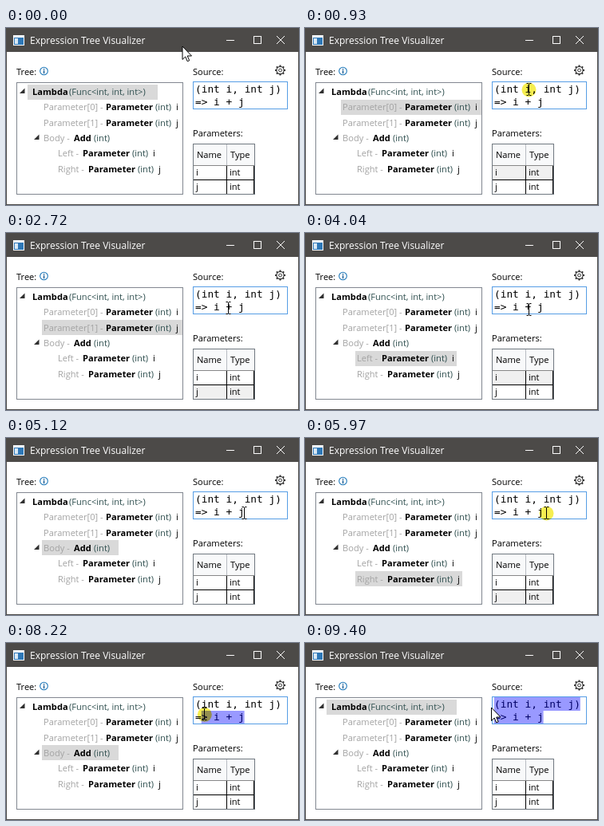
An HTML page with a canvas that plays this animation: 367x222 px, repeating every 9.69 s.

```html
<!DOCTYPE html>
<html lang="en">
<head>
<meta charset="utf-8">
<title>Expression Tree Visualizer</title>
<style>
html, body { margin: 0; width: 100%; height: 100%; overflow: hidden; background: #fff; }
canvas { display: block; }
</style>
</head>
<body>
<canvas id="stage" width="367" height="222"></canvas>
<script>
const g = document.getElementById('stage').getContext('2d');
const LOOP = 9690;
const UI = '"Open Sans", "Noto Sans", sans-serif';
const CODE = '12.8px "DejaVu Sans Mono", monospace';
const SLATE = '#2f4f4f', GREY = '#a3a3a3', BLACK = '#000', FRAME = '#4c4a48';
const ROW = 19.3, CHAR = 7.7, CODE_X = 237;

// Pointer path: time, x, y
const path = [
  [70, 221, 23], [800, 280, 77], [1210, 280, 77], [1700, 337, 77], [2260, 337, 77],
  [2720, 278, 94], [3270, 265, 97], [3700, 265, 96], [4040, 280, 96], [4600, 280, 96],
  [5300, 302, 94], [6000, 302, 94], [6500, 285, 94], [7280, 266, 94], [7430, 266, 94],
  [7600, 257, 95], [7840, 257, 95], [8750, 234, 80]
];
const presses = [[800, 1210], [1720, 2110], [3420, 3720], [4350, 4700], [5500, 9000]];
const picks = [[0, 0], [850, 1], [1800, 2], [3480, 4], [4450, 3], [5350, 5], [6450, 3], [8250, 0]];

// Tree rows: left and right of the highlight, then text parts as x, text, colour, bold
const tree = [
  [27, 190, [33, 'Lambda', BLACK, 1], [79, '(Func<int, int, int>)', SLATE]],
  [45, 221, [47, 'Parameter[0] - ', GREY], [125, 'Parameter', BLACK, 1], [187, '(int)', SLATE], [213, 'i', BLACK]],
  [45, 221, [47, 'Parameter[1] - ', GREY], [125, 'Parameter', BLACK, 1], [187, '(int)', SLATE], [213, 'j', BLACK]],
  [45, 141, [47, 'Body - ', GREY], [85, 'Add', BLACK, 1], [110, '(int)', SLATE]],
  [63, 190, [65, 'Left - ', GREY], [96, 'Parameter', BLACK, 1], [158, '(int)', SLATE], [184, 'i', BLACK]],
  [63, 197, [65, 'Right - ', GREY], [103, 'Parameter', BLACK, 1], [165, '(int)', SLATE], [191, 'j', BLACK]]
];

function rect(x, y, w, h, color) {
  g.fillStyle = color;
  g.fillRect(x, y, w, h);
}

function box(x, y, w, h, color) {
  g.lineWidth = 1;
  g.strokeStyle = color;
  g.strokeRect(x + .5, y + .5, w - 1, h - 1);
}

function line(color, width, ...points) {
  g.beginPath();
  points.forEach(([x, y]) => g.lineTo(x, y));
  g.lineWidth = width;
  g.strokeStyle = color;
  g.stroke();
}

function disc(x, y, r) {
  g.beginPath();
  g.arc(x, y, r, 0, Math.PI * 2);
}

function text(str, x, y, color = BLACK, font = '11.1px ' + UI) {
  g.font = font;
  g.fillStyle = color;
  g.fillText(str, x, y);
}

function pointerAt(t) {
  const i = path.findIndex(p => p[0] > t);
  if (i < 0) return path[path.length - 1].slice(1);
  if (!i) return path[0].slice(1);
  const [t0, x0, y0] = path[i - 1], [t1, x1, y1] = path[i];
  const u = (t - t0) / (t1 - t0), e = u * u * (3 - 2 * u);
  return [x0 + (x1 - x0) * e, y0 + (y1 - y0) * e];
}

function drawWindow() {
  rect(0, 0, 367, 222, '#fff');
  box(0, 0, 367, 222, FRAME);
  rect(0, 0, 367, 30, FRAME);
  rect(9, 9, 14, 13, '#fff');
  rect(10, 12, 12, 9, '#2f78b7');
  rect(11, 13, 4, 7, '#d8e8f5');
  text('Expression Tree Visualizer', 30, 19.5, '#fff', '12px ' + UI);
  line('#fff', 1, [276, 15.5], [286, 15.5]);
  box(310, 10, 10, 10, '#fff');
  line('#fff', 1, [339, 10], [349, 20]);
  line('#fff', 1, [349, 10], [339, 20]);
}

function drawIcons() {
  disc(47.5, 54, 4.8);
  g.lineWidth = 1.1;
  g.strokeStyle = '#1b76b8';
  g.stroke();
  rect(46.8, 51, 1.5, 1.4, '#1b5f98');
  rect(46.8, 53.2, 1.5, 4, '#1b5f98');

  g.strokeStyle = '#333';
  disc(343.5, 53, 4.6);
  g.lineWidth = 1.2;
  g.stroke();
  disc(343.5, 53, 1.9);
  g.lineWidth = 1;
  g.stroke();
  for (let k = 0; k < 8; k++) {
    const c = Math.cos(k * Math.PI / 4), s = Math.sin(k * Math.PI / 4);
    line('#333', 2, [343.5 + 4.6 * c, 53 + 4.6 * s], [343.5 + 6.5 * c, 53 + 6.5 * s]);
  }
}

function drawTree(picked) {
  text('Tree:', 13, 58.5);
  box(13, 68, 209, 141, '#828790');
  tree.forEach(([left, right, ...parts], i) => {
    const y = 70.5 + ROW * i;
    if (i === picked) rect(left, Math.round(y), right - left, 19, '#d9d9d9');
    for (const [x, str, color, bold] of parts)
      text(str, x, Math.round(y + 13.5), color, (bold ? 'bold ' : '') + '11.1px ' + UI);
  });
  for (const [x, y] of [[17, 82], [35, 140]]) {
    g.beginPath();
    g.moveTo(x, y);
    g.lineTo(x + 6.5, y);
    g.lineTo(x + 6.5, y - 6.5);
    g.fillStyle = '#303030';
    g.fill();
  }
}

function drawTable(picked) {
  text('Parameters:', 234, 136);
  rect(235, 146, 76, 27, '#f8f9fa');
  text('Name', 239, 163);
  text('Type', 281, 163);
  ['i', 'j'].forEach((name, i) => {
    const y = 173 + 18 * i;
    if (picked === 1 + i || picked === 4 + i) rect(235, y, 76, 17, '#f0f0f0');
    text(name, 238, y + 12);
    text('int', 280, y + 12);
    line(BLACK, 1, [235, y + 17.5], [311, y + 17.5]);
  });
  line('#b8bcc2', 1, [276.5, 146], [276.5, 172]);
  line('#888', 1, [235, 172.5], [311, 172.5]);
  line(BLACK, 1, [276.5, 173], [276.5, 208]);
  line(BLACK, 1, [310.5, 173], [310.5, 208]);
  box(234, 145, 78, 64, '#707880');
}

function drawSource(t, x, y) {
  text('Source:', 234, 58.5);
  box(234, 67, 119, 35, '#569de5');
  text('(int i, int j)', CODE_X, 81, BLACK, CODE);
  text('=> i + j', CODE_X, 97, BLACK, CODE);
  if (t < 6000) return;
  const col = Math.max(0, Math.min(14, Math.round((x - CODE_X) / CHAR)));
  const upper = y < 85, tint = 'rgba(0,0,255,.4)';
  const select = (from, to, top, h) =>
    rect(CODE_X + from * CHAR, top, (to - from) * CHAR, h, tint);
  if (upper) select(col, 14, 68, 17);
  select(upper ? 0 : Math.min(col, 8), 8, 85, 16);
}

function drawArrow(x, y) {
  g.beginPath();
  [[0, 0], [0, 16.5], [3.7, 13], [6.2, 18.8], [8.7, 17.8], [6.2, 12], [11.5, 12]]
    .forEach(([dx, dy]) => g.lineTo(x + dx, y + dy));
  g.closePath();
  g.fillStyle = '#fff';
  g.fill();
  g.lineWidth = 1;
  g.strokeStyle = BLACK;
  g.stroke();
}

function drawBeam(x, y) {
  x = Math.round(x) + .5;
  y = Math.round(y);
  line(BLACK, 1, [x, y - 7], [x, y + 7]);
  for (const s of [-1, 1]) {
    line(BLACK, 1, [x - 3, y + 7.5 * s], [x - .5, y + 7.5 * s]);
    line(BLACK, 1, [x + .5, y + 7.5 * s], [x + 3, y + 7.5 * s]);
  }
}

function drawPointer(t, x, y) {
  const press = presses.find(([a, b]) => t >= a && t < b);
  if (press) {
    g.globalCompositeOperation = 'multiply';
    disc(x + .5, y + .5, press[1] - t < 100 ? 12 : 9);
    g.fillStyle = '#f6ee50';
    g.fill();
    g.globalCompositeOperation = 'source-over';
  }
  if (t >= 9400) drawArrow(233.5, 81);
  else if (t < 9000) (x >= 234 && y > 67 ? drawBeam : drawArrow)(x, y);
}

function draw(now) {
  const t = now % LOOP;
  const [x, y] = pointerAt(t);
  const picked = picks.filter(p => p[0] <= t).pop()[1];
  drawWindow();
  drawIcons();
  drawTree(picked);
  drawTable(picked);
  drawSource(t, x, y);
  drawPointer(t, x, y);
}

let start;
function tick(now) {
  start ??= now;
  draw(now - start);
  requestAnimationFrame(tick);
}
requestAnimationFrame(tick);
</script>
</body>
</html>
```
